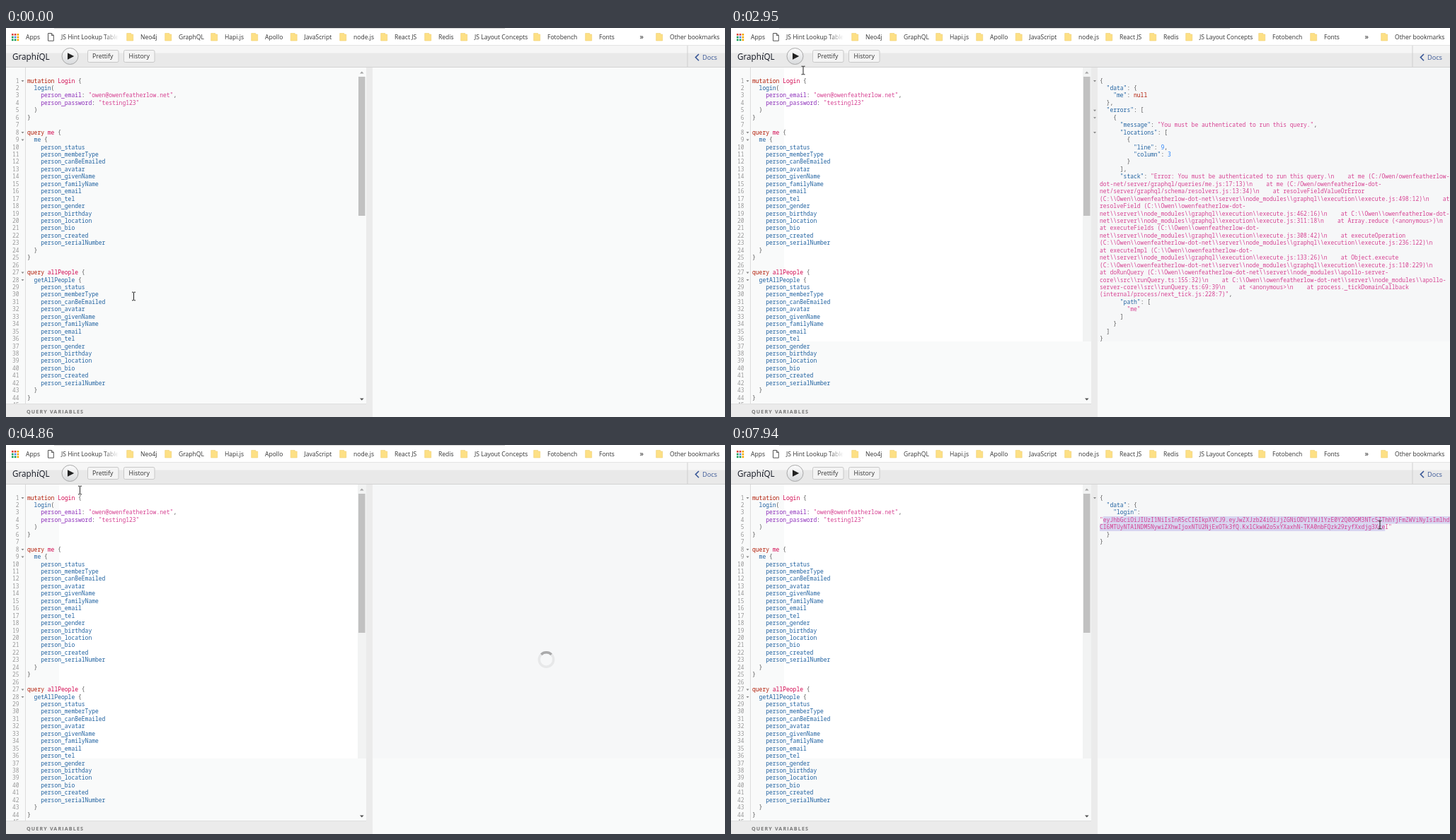
Animation of 1016x551 px, one loop 8000 ms. Source, as an HTML page:

```html
<!DOCTYPE html>
<html lang="en">
<head>
<meta charset="utf-8">
<title>GraphiQL</title>
<style>
html, body { margin: 0; width: 100%; height: 100%; overflow: hidden; background: #f9fafa; }
svg { display: block; }
text { font-family: "Open Sans", "Noto Sans", sans-serif; white-space: pre; }
.code text { font: 8px "Noto Sans Mono", "DejaVu Sans Mono", monospace; }
</style>
</head>
<body>
<svg id="stage" width="1016" height="551" viewBox="0 0 1016 551">
  <defs>
    <linearGradient id="btn" x2="0" y2="1">
      <stop stop-color="#fdfdfd"/><stop offset="1" stop-color="#d8dadc"/>
    </linearGradient>
    <linearGradient id="fade">
      <stop stop-color="#fff" stop-opacity="0"/><stop offset="1" stop-color="#fff"/>
    </linearGradient>
    <filter id="shadow" x="-10%" y="-10%" width="125%" height="125%">
      <feDropShadow dx="0" dy="1" stdDeviation="1.5" flood-opacity=".3"/>
    </filter>
  </defs>
</svg>
<script>
const LOOP = 8000, ROW = 10.442, COL = 4.8, BASE = 77.6, LEFT = 30, RIGHT = 521;
const stage = document.getElementById("stage");

function add(parent, tag, attrs = {}, content) {
  const el = document.createElementNS("http://www.w3.org/2000/svg", tag);
  for (const k in attrs) el.setAttribute(k, attrs[k]);
  if (content !== undefined) el.textContent = content;
  parent.appendChild(el);
  return el;
}
const group = (parent = stage, attrs) => add(parent, "g", attrs);
const rect = (p, x, y, width, height, fill, more) =>
  add(p, "rect", { x, y, width, height, fill, ...more });
const path = (p, d, more) => add(p, "path", { d, fill: "none", ...more });
const label = (p, x, y, size, fill, str, more) =>
  add(p, "text", { x, y, "font-size": size, fill, ...more }, str);
const show = (el, on) => el.setAttribute("visibility", on ? "visible" : "hidden");

// ---- code text ----
const fields = ("status memberType canBeEmailed avatar givenName familyName email tel " +
  "gender birthday location bio created serialNumber").split(" ")
  .map(f => "    person_" + f).join("\n");

const query = `mutation Login {
  login(
    person_email: "owen@owenfeatherlow.net",
    person_password: "testing123"
  )
}

query me {
  me {
${fields}
  }
}

query allPeople {
  getAllPeople {
${fields}
  }
}`;

const failure = String.raw`{
  "data": {
    "me": null
  },
  "errors": [
    {
      "message": "You must be authenticated to run this query.",
      "locations": [
        {
          "line": 9,
          "column": 3
        }
      ],
      "stack": "Error: You must be authenticated to run this query.\n    at me (C:/Owen/owenfeatherlow-
dot-net/server/graphql/queries/me.js:17:13)\n    at me (C:/Owen/owenfeatherlow-dot-
net/server/graphql/schema/resolvers.js:13:34)\n    at resolveFieldValueOrError
(C:\\Owen\\owenfeatherlow-dot-net\\server\\node_modules\\graphql\\execution\\execute.js:498:12)\n    at
resolveField (C:\\Owen\\owenfeatherlow-dot-
net\\server\\node_modules\\graphql\\execution\\execute.js:462:16)\n    at C:\\Owen\\owenfeatherlow-dot-
net\\server\\node_modules\\graphql\\execution\\execute.js:311:18\n    at Array.reduce (<anonymous>)\n
at executeFields (C:\\Owen\\owenfeatherlow-dot-
net\\server\\node_modules\\graphql\\execution\\execute.js:308:42)\n    at executeOperation
(C:\\Owen\\owenfeatherlow-dot-net\\server\\node_modules\\graphql\\execution\\execute.js:236:122)\n
at executeImpl (C:\\Owen\\owenfeatherlow-dot-
net\\server\\node_modules\\graphql\\execution\\execute.js:133:26)\n    at Object.execute
(C:\\Owen\\owenfeatherlow-dot-net\\server\\node_modules\\graphql\\execution\\execute.js:110:229)\n
at doRunQuery (C:\\Owen\\owenfeatherlow-dot-net\\server\\node_modules\\apollo-server-
core\\src\\runQuery.ts:155:32)\n    at C:\\Owen\\owenfeatherlow-dot-net\\server\\node_modules\\apollo-
server-core\\src\\runQuery.ts:69:39\n    at <anonymous>\n    at process._tickDomainCallback
(internal/process/next_tick.js:228:7)",
      "path": [
        "me"
      ]
    }
  ]
}`;

const success = `{
  "data": {
    "login":
"eyJhbGciOiJIUzI1NiIsInR5cCI6IkpXVCJ9.eyJwZXJzb24iOiJjZGNiODV1YWJ1YzE0Y2Q0OGM3NTc5ZThhYjFmZWViNyIsImlhd
CI6MTUyNTA1NDM5NywiZXhwIjoxNTU2NjExOTk3fQ.KxlCkwW2o5xYXaxhN-TKA0nbFQzk29ryfXxdjg3XceI"
  }
}`;

function tokenColor(tok, next, prev) {
  if (tok[0] === '"') return next === ":" ? "#1f61a0" : "#d64292";
  if (/^(mutation|query|null)$/.test(tok)) return "#b11a04";
  if (/^\d/.test(tok)) return "#2882f9";
  if (!/^\w/.test(tok)) return "#555";
  if (/^(mutation|query)$/.test(prev)) return "#d2054e";
  return next === ":" ? "#8b2bb9" : "#1f61a0";
}

function code(parent, src, x) {
  const g = group(parent, { class: "code" });
  let row = 0, prev = "", line;
  const newLine = () => { line = add(g, "text", { x, y: BASE + row++ * ROW }); };
  newLine();
  for (const m of src.matchAll(/"[^"]*"|\w+|[^\w"]+/g)) {
    const tok = m[0], fill = tokenColor(tok, src[m.index + tok.length], prev);
    tok.split("\n").forEach((part, i) => {
      if (i) newLine();
      if (part) add(line, "tspan", { fill }, part);
    });
    if (tok.trim()) prev = tok;
  }
  return g;
}

function folds(parent, x, rows) {
  const g = group(parent);
  for (const r of rows) path(g, `M${x - 2} ${74 + (r - 1) * ROW}h4l-2 2.4z`, { fill: "#888" });
  return g;
}

// ---- panes ----
rect(stage, 0, 0, 1016, 551, "#f9fafa");
const patch = rect(stage, 86, 81, 97, 305, "#fff");
const fresh = group();
rect(fresh, 75, 56, 422, 388, "#fff");
rect(fresh, 497, 56, 12, 388, "#f2f3f3");
rect(fresh, 518, 56, 498, 388, "#f6f7f8");
rect(stage, 27, 56, 1, 477, "#dddddd");

const nums = group(stage, { class: "code", "text-anchor": "end" });
for (let i = 0; i < 45; i++) add(nums, "text", { x: 18.5, y: BASE + i * ROW, fill: "#999" }, i + 1);
folds(stage, 23.5, [1, 8, 9, 27, 28]);
code(stage, query, LEFT);

rect(stage, 498, 69, 9.5, 197, "#c1c1c1");
path(stage, "M500 64.5h5.6l-2.8-3z", { fill: "#a3a3a3" });
path(stage, "M500 524.5h5.6l-2.8 3z", { fill: "#505050" });
rect(stage, 509, 56, 9, 495, "#ebebeb");
rect(stage, 0, 533, 509, 18, "#ebebeb");
rect(stage, 0, 532, 509, 1, "#dedede");
label(stage, 29, 546, 7.2, "#777", "QUERY VARIABLES", { "font-weight": 700, "letter-spacing": 1.1 });

// ---- results ----
const marks = [0, 1, 2].map(() => rect(stage, RIGHT, 0, 0, ROW, "#d7d4f0"));
const failed = code(stage, failure, RIGHT);
const failedFolds = folds(stage, 514, [1, 5, 6, 8]);
const passed = code(stage, success, RIGHT);
const passedFolds = folds(stage, 514, [1]);

const spinner = group();
add(spinner, "circle", { r: 10.2, fill: "none", stroke: "#e7e8e9", "stroke-width": 3.4 });
path(spinner, "M-7.2-7.2A10.2 10.2 0 0 1 7.2-7.2", { stroke: "#a9a9aa", "stroke-width": 3.4 });

// ---- toolbar ----
rect(stage, 0, 24, 1016, 12, "#f6f6f6");
rect(stage, 0, 35.5, 1016, 20, "#e9e9e9");
rect(stage, 0, 55, 1016, 1, "#d3d3d3");
const title = label(stage, 9, 45, 11.7, "#141823", "Graph");
add(title, "tspan", { "font-family": "'Noto Serif', serif", "font-style": "italic" }, "i");
add(title, "tspan", {}, "QL");
add(stage, "circle", { cx: 90.5, cy: 40, r: 11.5, fill: "url(#btn)", stroke: "#a9a9a9" });
path(stage, "M87 35.2L96.2 40 87 44.8z", { fill: "#222" });
for (const [x, tx, str] of [[115, 122, "Prettify"], [166, 173.5, "History"]]) {
  rect(stage, x + .5, 31.5, 43.5, 17, "#f4f4f4", { rx: 2, stroke: "#c8c8c8" });
  label(stage, tx, 43.3, 8.8, "#333", str);
}
rect(stage, 962.5, 24, 1, 31, "#cfcfcf");
path(stage, "M979 37l-4.6 4.6 4.6 4.6", { stroke: "#3b5998", "stroke-width": 1.6 });
label(stage, 984, 45, 9.2, "#3b5998", "Docs");

// ---- bookmarks ----
rect(stage, 0, 0, 1016, 24.3, "#fff");
rect(stage, 68, 0, 637, 1, "#d4d4d4");
rect(stage, 0, 24, 1016, 1, "#e4e4e4");
const dots = ["#db4437", "#db4437", "#f4a800", "#0f9d58", "#4285f4", "#f4a800", "#0f9d58", "#0f9d58", "#f4a800"];
dots.forEach((c, i) => rect(stage, 8 + i % 3 * 3.8, 8 + (i / 3 | 0) * 3.8, 2.6, 2.6, c));
const mark = (x, str) => label(stage, x, 16, 8.55, "#333", str);
mark(28, "Apps");
path(stage, "M59.5 7.5h4.8l3 3v7.7h-7.8zM64.3 7.5v3h3", { stroke: "#555" });
mark(78, "JS Hint Lookup Tables");
rect(stage, 138, 4, 21, 17, "url(#fade)");
rect(stage, 159, 4, 10, 17, "#fff");
const bookmarks = { Neo4j: 190, GraphQL: 244, "Hapi.js": 309, Apollo: 366, JavaScript: 421.5,
  "node.js": 491, "React JS": 549, Redis: 611, "JS Layout Concepts": 662, Fotobench: 765,
  Fonts: 838, "Other bookmarks": 938 };
for (const str in bookmarks) {
  const x = bookmarks[str];
  path(stage, `M${x - 19.3} 7.5h6v1.5h3v9h-9z`, { fill: "#fde085", stroke: "#efcf70", "stroke-width": .6 });
  mark(x, str);
}
label(stage, 895.5, 16, 11, "#222", "»");

// ---- run menu ----
const menu = group();
rect(menu, 78.5, 54.5, 76, 107.5, "#fff", { stroke: "#c9c9c9", "stroke-width": .7, filter: "url(#shadow)" });
const hover = rect(menu, 78.5, 0, 76, 16.8, "#e10098");
const items = ["Login", "me", "allPeople", "GetPerson", "getAllArticles", "getArticle"]
  .map((str, i) => label(menu, 86, 69.2 + i * 16.7, 8.95, "#222", str));

// ---- pointer ----
const outline = { fill: "#fff", stroke: "#000", "stroke-width": .9, "stroke-linejoin": "round" };
const shapes = {
  beam: path(stage, "M-2.5-5.8h1.8l.7.6.7-.6h1.8M0-5.2V5.2M-2.5 5.8h1.8l.7-.6.7.6h1.8", { stroke: "#222", "stroke-width": 1 }),
  arrow: path(stage, "M0 0V10.5L2.4 8.3 4 12 5.6 11.3 4 7.7H7.3Z", outline),
  hand: path(stage, "M-1.3 8V1a1.3 1.3 0 0 1 2.6 0V5.5q2.6-.6 2.6.9 2.2-.4 2.4.9 2-.3 2 1.2V11q0 3-1.6 4H.2q-1-2-4-5-.8-1.4.6-1.8 1 0 1.9 1z", outline)
};

// start time, number of 120 ms steps, shape, end point
const moves = [
  [0, 1, "beam", 180.5, 380], [230, 1, "beam", 180.5, 379.5], [460, 1, "beam", 89, 87],
  [610, 1, "arrow", 76, 51], [760, 1, "arrow", 94, 55], [910, 1, "hand", 96, 43],
  [1060, 2, "hand", 94, 41], [1460, 3, "hand", 97, 73], [1850, 2, "hand", 98.5, 83],
  [2280, 1, "beam", 101.5, 83], [2830, 2, "beam", 102, 60], [3100, 3, "hand", 95, 38],
  [3460, 3, "hand", 96, 44], [3850, 4, "hand", 102, 61], [4360, 1, "hand", 103, 65],
  [4860, 1, "beam", 104.5, 64], [4980, 2, "beam", 330, 90], [5220, 1, "arrow", 500, 122],
  [5370, 1, "beam", 544, 135], [5490, 2, "beam", 529.5, 113], [5760, 2, "beam", 528, 107.5],
  [6150, 1, "beam", 547, 108], [6300, 1, "beam", 674, 110], [6450, 1, "beam", 790, 117],
  [6570, 1, "beam", 874, 126], [6720, 2, "beam", 918, 127], [6990, 1, "beam", 930, 118.5],
  [7300, 2, "beam", 930, 117.5], [7700, 1, "beam", 927, 124], [7820, 2, "beam", 917, 113]
];

function pointer(t) {
  const i = moves.findLastIndex(m => m[0] <= t);
  const [start, steps, kind, x, y] = moves[i];
  const from = moves[Math.max(0, i - 1)];
  const k = Math.min(steps, Math.floor((t - start) / 120) + 1) / steps;
  return { kind, x: from[3] + (x - from[3]) * k, y: from[4] + (y - from[4]) * k };
}

function select(t, p) {
  const top = 101.1;
  const done = t >= 6990;
  const last = done ? 1 : Math.max(0, Math.floor((p.y - top) / ROW));
  const lengths = [103, 85, 3];
  marks.forEach((m, row) => {
    const on = t >= 6030 && row <= last;
    show(m, on);
    if (!on) return;
    const x = RIGHT + (row ? 0 : COL);
    const col = done ? 84 : Math.min(lengths[row], Math.ceil((p.x - RIGHT) / COL));
    const end = row < last ? 1016 : RIGHT + col * COL;
    m.setAttribute("x", x);
    m.setAttribute("y", top + row * ROW);
    m.setAttribute("width", Math.max(0, end - x));
  });
}

function draw(t) {
  const between = (a, b) => t >= a && t < b;
  show(patch, t >= 460);
  show(fresh, t >= 2280);
  show(failed, between(2280, 4860));
  show(failedFolds, between(2680, 4860));
  show(passed, t >= 5220);
  show(passedFolds, t >= 5370);

  show(spinner, between(4860, 5220));
  const turn = Math.floor((t - 4860) / 120) * 72;
  spinner.setAttribute("transform", `translate(763.5 304) rotate(${turn})`);

  const open = between(1060, 2280) || between(3460, 4860);
  menu.setAttribute("display", open ? "inline" : "none");
  const pick = between(1850, 2280) ? 1 : between(1580, 1850) || between(3970, 4860) ? 0 : -1;
  hover.setAttribute("fill-opacity", pick < 0 ? 0 : 1);
  hover.setAttribute("y", 57.3 + Math.max(0, pick) * 16.7);
  items.forEach((el, i) => el.setAttribute("fill", i === pick ? "#fff" : "#222"));

  const p = pointer(t);
  for (const kind in shapes) show(shapes[kind], kind === p.kind);
  shapes[p.kind].setAttribute("transform", `translate(${p.x} ${p.y})`);
  select(t, p);
}

const begin = performance.now();
function tick() {
  draw((performance.now() - begin) % LOOP);
  requestAnimationFrame(tick);
}
tick();
</script>
</body>
</html>
```
